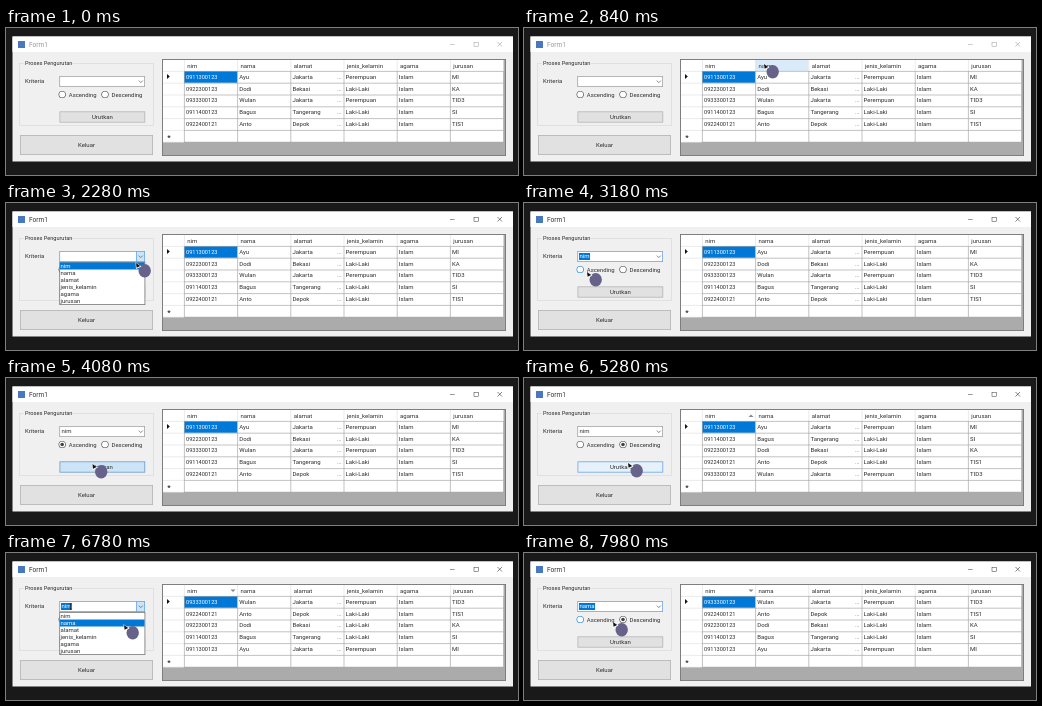
Recreate the animation shown at these times as an HTML page with a canvas. Size 512 by 147 pixels, loop 8 s.

```html
<!DOCTYPE html>
<html lang="id">
<head>
<meta charset="utf-8">
<title>Form1</title>
<style>
html, body { margin: 0; width: 512px; height: 147px; overflow: hidden; background: #191919; }
canvas { display: block; }
</style>
</head>
<body>
<canvas id="stage" width="512" height="147"></canvas>
<script>
const ctx = document.getElementById('stage').getContext('2d');
const LOOP = 8000, STEP = 60;
const BLUE = '#0078d7', EDGE = '#6aa6e6', INK = '#2c2c2c';
const FONT = 'Roboto, "Liberation Sans", sans-serif';

const ITEMS = ['nim', 'nama', 'alamat', 'jenis_kelamin', 'agama', 'jurusan'];
const ROWS = [
  ['0911300123', 'Ayu', 'Jakarta', 'Perempuan', 'Islam', 'MI'],
  ['0922300123', 'Dodi', 'Bekasi', 'Laki-Laki', 'Islam', 'KA'],
  ['0933300123', 'Wulan', 'Jakarta', 'Perempuan', 'Islam', 'TID3'],
  ['0911400123', 'Bagus', 'Tangerang', 'Laki-Laki', 'Islam', 'SI'],
  ['0922400121', 'Anto', 'Depok', 'Laki-Laki', 'Islam', 'TIS1']
];
const ASC = [...ROWS].sort((a, b) => a[0].localeCompare(b[0]));
const DESC = [...ASC].reverse();

// pointer waypoints: time, x, y
const PATH = [
  [120, 477, 69], [240, 400, 52], [360, 270, 30], [420, 205, 26], [540, 240, 36],
  [840, 240, 36], [1020, 190, 45], [1200, 140, 62], [1320, 134, 53],
  [1740, 134, 53], [2280, 130, 60], [2520, 108, 62], [2640, 108, 62], [3120, 63, 69],
  [3360, 63, 69], [3900, 86.5, 86],
  [4380, 86.5, 86], [4740, 112, 67], [4860, 112, 67], [5160, 104, 85],
  [5700, 104, 85], [6420, 135, 54], [6600, 135, 54], [6780, 118, 72],
  [7199, 118, 72], [7200, 118, 73], [7319, 118, 73], [7320, 118, 72],
  [7560, 118, 72], [7980, 89, 69]
];

function pointer(t) {
  if (t < PATH[0][0]) return { x: -50, y: -50 };
  for (let i = 1; i < PATH.length; i++) {
    const [t0, x0, y0] = PATH[i - 1], [t1, x1, y1] = PATH[i];
    if (t <= t1) {
      const k = (t - t0) / (t1 - t0);
      return { x: x0 + (x1 - x0) * k, y: y0 + (y1 - y0) * k };
    }
  }
  const [, x, y] = PATH[PATH.length - 1];
  return { x, y };
}

const within = (t, a, b) => t >= a && t < b;
const hit = (p, x, y, w, h) => p.x >= x && p.x < x + w && p.y >= y && p.y < y + h;

function fill(x, y, w, h, color) {
  ctx.fillStyle = color;
  ctx.fillRect(x, y, w, h);
}

function box(x, y, w, h, back, edge, width = 0.8) {
  fill(x, y, w, h, edge);
  fill(x + width, y + width, w - 2 * width, h - 2 * width, back);
}

function text(s, x, mid, color = INK, size = 6, align = 'left') {
  ctx.font = size + 'px ' + FONT;
  ctx.textAlign = align;
  ctx.fillStyle = color;
  ctx.fillText(s, x, mid + 2.1);
}

function line(color, width, ...pts) {
  ctx.strokeStyle = color;
  ctx.lineWidth = width;
  ctx.beginPath();
  for (let i = 0; i < pts.length; i += 2) ctx.lineTo(pts[i], pts[i + 1]);
  ctx.stroke();
}

function shape(color, ...pts) {
  ctx.fillStyle = color;
  ctx.beginPath();
  for (let i = 0; i < pts.length; i += 2) ctx.lineTo(pts[i], pts[i + 1]);
  ctx.fill();
}

function disc(x, y, r, color) {
  ctx.fillStyle = color;
  ctx.beginPath();
  ctx.arc(x, y, r, 0, Math.PI * 2);
  ctx.fill();
}

function drawWindow(active) {
  fill(0, 0, 512, 147, '#191919');
  fill(6.5, 8.5, 500.5, 125, '#f0f0f0');
  fill(6.5, 8.5, 500.5, 15.5, '#fff');
  fill(12, 13, 7, 7, '#4a78c0');
  const c = active ? '#333' : '#999';
  text('Form1', 23, 16.6, c, 6.5);
  line(c, 0.5, 444, 16.5, 448.7, 16.5);
  ctx.lineWidth = 0.5;
  ctx.strokeRect(468, 14.3, 4.4, 4.4);
  line(c, 0.6, 491.5, 14, 496, 18.5);
  line(c, 0.6, 496, 14, 491.5, 18.5);
}

function button(label, x, y, w, h, state) {
  const [back, edge] = {
    normal: ['#e1e1e1', '#b4b4b4'],
    focus: ['#e1e1e1', EDGE],
    hot: ['#e5f1fb', EDGE],
    down: ['#cce4f7', '#6a98c4']
  }[state];
  box(x, y, w, h, back, edge);
  text(label, x + w / 2, y + h / 2, INK, 6, 'center');
}

function radio(label, x, checked, hot) {
  const c = hot ? BLUE : '#444';
  disc(x, 66.5, 3.6, c);
  disc(x, 66.5, 3, '#fff');
  if (checked) disc(x, 66.5, 1.8, c);
  text(label, x + 6.6, 66.5, INK, 5.9);
}

function combo(s, p) {
  const hot = hit(p, 53, 48, 87, 12);
  box(53.3, 48, 85.7, 11, '#fff', s.focus === 'combo' ? EDGE : hot ? '#666' : '#a4a4a4');
  if (s.open || hot) box(130, 48, 9, 11, s.open ? '#cce4f7' : '#e5f1fb', EDGE);
  line('#555', 0.7, 132.8, 52.6, 134.8, 54.6, 136.8, 52.6);
  if (!s.value) return;
  const marked = s.focus === 'combo';
  ctx.font = '6px ' + FONT;
  if (marked) fill(55, 50, ctx.measureText(s.value).width + 1, 7, BLUE);
  text(s.value, 55.5, 53.2, marked ? '#fff' : INK);
  if (s.caret) fill(64, 50, 0.8, 7, '#222');
}

function dropList(hover) {
  box(53.3, 59, 86, 43, '#fff', '#777');
  ITEMS.forEach((item, i) => {
    const y = 59.5 + i * 7;
    if (i === hover) fill(54, y, 84.5, 7, BLUE);
    text(item, 54.5, y + 3.5, i === hover ? '#fff' : INK);
  });
}

function grid(rows, sort, p) {
  const left = 178, top = 43, cw = 53.2, rh = 11.8;
  box(156, 31, 344, 97, '#ababab', '#747474');
  fill(157, 32, 340.5, 82, '#fff');
  ITEMS.forEach((name, i) => {
    const x = left + i * cw;
    if (hit(p, x, 32, cw, 11)) fill(x, 32, cw, 11, '#d9ebf9');
    line('#e2e2e2', 0.7, x + 0.4, 32, x + 0.4, top);
    text(name, x + 3.3, 37.5);
  });
  if (sort > 0) shape('#888', 224.5, 39, 229.5, 39, 227, 36.5);
  if (sort < 0) shape('#888', 224.5, 36.5, 229.5, 36.5, 227, 39);

  fill(left, top, cw, rh, BLUE);
  rows.forEach((row, r) => row.forEach((cell, i) => {
    const x = left + i * cw, mid = top + 5.6 + r * rh;
    text(cell, x + 2, mid, r + i ? INK : '#fff', i ? 6 : 5.6);
    if (i === 2) text('...', x + 46.5, mid, '#666');
  }));
  for (let r = 0; r <= 6; r++) {
    const y = top + r * rh + 0.4;
    line('#a9a9a9', 0.7, left, y, 497.5, y);
    line('#e2e2e2', 0.7, 157, y, left, y);
  }
  for (let i = 0; i <= 6; i++) {
    const x = left + i * cw + 0.4;
    line('#a9a9a9', 0.7, x, top, x, 114);
  }
  shape('#111', 161, 46, 163.8, 48.5, 161, 51);
  text('*', 163, 109.5, '#111', 8, 'center');
}

function cursor(p) {
  const { x, y } = p;
  ctx.fillStyle = '#67628a';
  ctx.beginPath();
  ctx.ellipse(x + 8.7, y + 7.8, 6.2, 6.8, 0, 0, Math.PI * 2);
  ctx.fill();
  shape('#fff', x - 0.5, y - 0.8, x + 5.5, y + 3.4, x, y + 6);
  shape('#111', x, y, x + 4.2, y + 3, x + 0.6, y + 4.8);
}

function stateAt(t) {
  const focus = t < 1560 ? '' : t < 3240 ? 'combo' : t < 4080 ? 'radio' :
    t < 4800 ? 'button' : t < 5340 ? 'radio' : t < 6540 ? 'button' : 'combo';
  return {
    focus,
    active: t >= 1560,
    open: within(t, 1620, 2580) || within(t, 6600, 7560),
    value: t < 2580 ? '' : t < 7560 ? 'nim' : 'nama',
    caret: within(t, 6600, 7020),
    choice: t < 3240 ? '' : t < 4800 ? 'asc' : 'desc',
    down: within(t, 4080, 4140) || within(t, 5340, 5400),
    sort: t < 4140 ? 0 : t < 5400 ? 1 : -1
  };
}

function draw(t) {
  const s = stateAt(t), p = pointer(t);
  const free = s.open ? { x: -50, y: -50 } : p;
  drawWindow(s.active);

  ctx.strokeStyle = '#dcdcdc';
  ctx.lineWidth = 0.8;
  ctx.strokeRect(13.5, 35.5, 134, 62);
  fill(17.5, 32, 49, 7, '#f0f0f0');
  text('Proses Pengurutan', 19, 35, INK, 5.6);
  text('Kriteria', 19, 53.2);

  combo(s, p);
  radio('Ascending', 56.2, s.choice === 'asc', hit(free, 53, 62, 37, 9));
  radio('Descending', 99, s.choice === 'desc', hit(free, 96, 62, 43, 9));
  const over = hit(free, 53, 83, 87, 12);
  button('Urutkan', 53.5, 83.4, 85.7, 11.2, s.down ? 'down' : over ? 'hot' :
    s.focus === 'button' ? 'focus' : 'normal');
  button('Keluar', 14, 107, 133, 20, 'normal');

  grid(s.sort > 0 ? ASC : s.sort < 0 ? DESC : ROWS, s.sort, p);

  if (s.open) {
    const row = Math.floor((p.y - 59) / 7);
    dropList(row >= 0 ? Math.min(row, t >= 7200 && t < 7320 ? 2 : 1) : s.value ? 0 : -1);
  }
  cursor(p);
}

const start = performance.now();
function tick() {
  const t = (performance.now() - start) % LOOP;
  draw(Math.floor(t / STEP) * STEP);
  requestAnimationFrame(tick);
}
tick();
</script>
</body>
</html>
```
